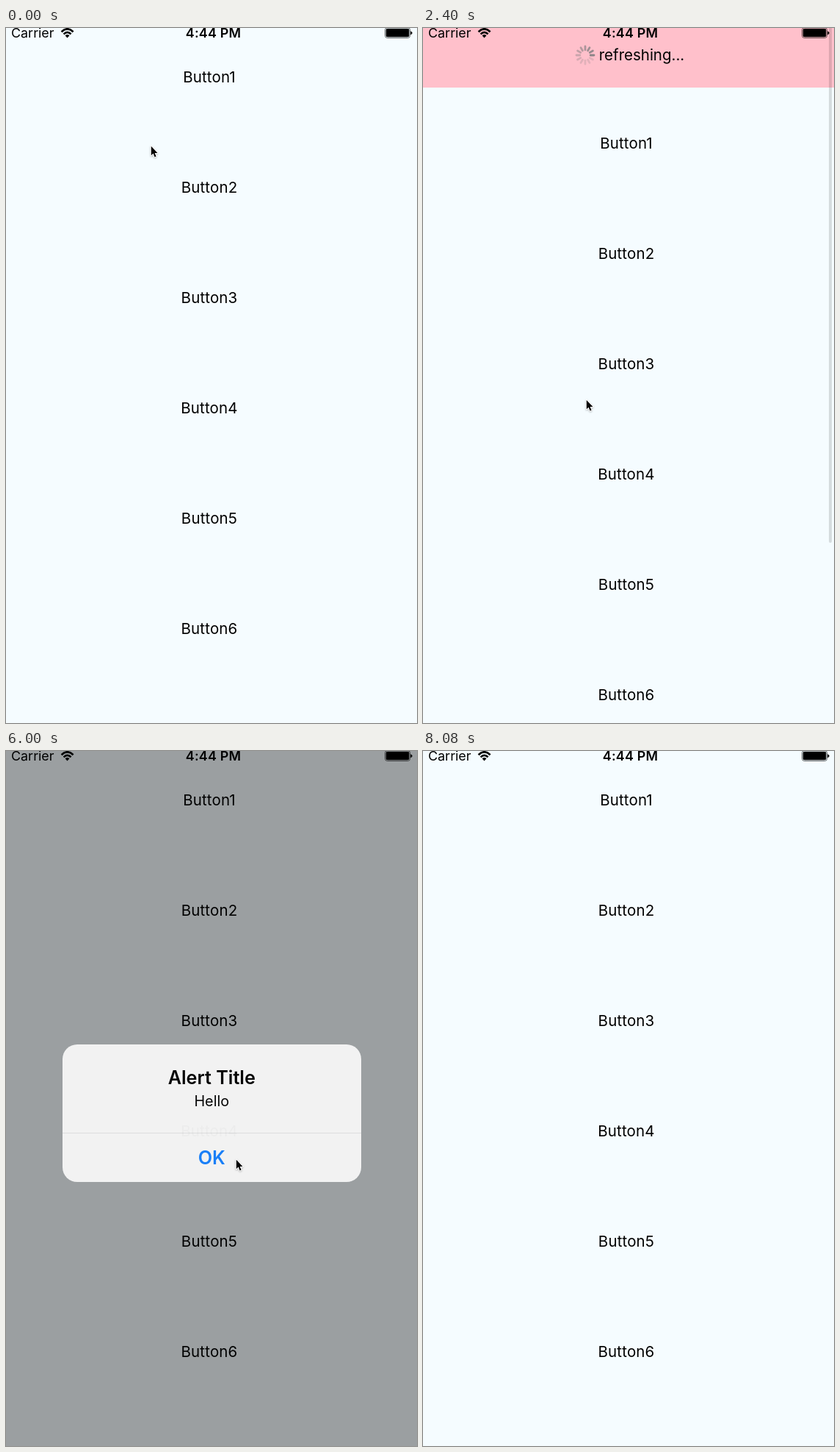
An HTML page for the animation above (8.27 s loop, 560x945 px).

```html
<!DOCTYPE html>
<html lang="en">
<head>
<meta charset="utf-8">
<title>Pull to refresh</title>
<style>
  html, body { margin: 0; width: 100%; height: 100%; overflow: hidden; }
  body { position: relative; background: #f5fcff; color: #000; font: 20.5px/24px Inter, Roboto, sans-serif; }
  body > *, .abs { position: absolute; }
  #scroll { left: 0; top: -99px; width: 560px; }
  #head {
    box-sizing: border-box; height: 90px; padding: 2px 0 0 2px; background: #ffc0cb;
    display: flex; align-items: center; justify-content: center; white-space: pre;
  }
  #arrow { width: 24px; height: 40px; margin: 0 10px; fill: #dc1f05; }
  #spin { width: 30px; height: 30px; margin-right: 4px; stroke: #8c8487; stroke-width: 2.8; stroke-linecap: round; }
  .row { width: 554px; height: 150px; line-height: 152px; text-align: center; letter-spacing: .15px; }
  #bar { left: 553px; top: -9px; width: 4px; border-radius: 2px; background: rgba(0, 0, 0, .35); }
  #shade { inset: 0; background: rgba(0, 0, 0, .4); }
  #status { left: 0; top: 0; }
  .carrier { left: 7px; top: -5px; font-size: 17.9px; }
  .clock { left: 0; top: -5px; width: 565px; text-align: center; font-size: 17.9px; font-weight: 600; letter-spacing: .2px; }
  #alert {
    left: 77px; top: 399px; width: 406.5px; height: 186.5px; border-radius: 20px;
    background: #f6f6f6; text-align: center;
  }
  #alert div { position: absolute; left: 0; width: 100%; }
  .title { top: 33px; font-size: 25.2px; font-weight: 600; }
  .note { top: 65px; font-size: 19.8px; }
  .line { top: 120px; height: 1px; background: #dfe0e1; }
  .ok { top: 142px; font-size: 25.2px; font-weight: 600; color: #147efb; }
  #cursor { left: -3px; top: -3px; filter: drop-shadow(0 1px 1px rgba(0, 0, 0, .25)); }
</style>
</head>
<body>
<div id="scroll">
  <div id="head">
    <svg id="arrow" viewBox="0 0 24 40"><path d="M12 0L24 13H17V17H7V13H0zM7 20H17V24H7zM7 27H17V31H7zM7 34H17V39.5H7z"/></svg>
    <svg id="spin" viewBox="-15 -15 30 30"></svg>
    <span id="label"></span>
  </div>
</div>
<div id="bar"></div>
<div id="status">
  <div class="abs carrier">Carrier</div>
  <div class="abs clock">4:44 PM</div>
  <svg class="abs" width="560" height="20" style="left:0;top:0">
    <g fill="none" stroke="#000" stroke-width="2.6">
      <path d="M75.6 5.2Q83.5 -2.6 91.6 5.2"/>
      <path d="M78.6 8.3Q83.5 3.4 88.6 8.3"/>
    </g>
    <path d="M80.6 10.2Q83.5 8 86.5 10.2L83.5 13.4z"/>
    <rect x="516.5" y="-.5" width="34" height="14" rx="3" fill="none" stroke="#000" stroke-opacity=".6"/>
    <rect x="517.7" y=".7" width="31.6" height="11.6" rx="2"/>
    <path d="M551.3 4.2Q553.6 5 553.6 6.7T551.3 9.2z"/>
  </svg>
</div>
<div id="shade"></div>
<div id="alert">
  <div class="title">Alert Title</div>
  <div class="note">Hello</div>
  <div class="line"></div>
  <div class="ok">OK</div>
</div>
<svg id="cursor" width="18" height="24" viewBox="-3 -3 18 24">
  <path d="M.8 .8V13.2L3.6 10.6L5.6 15.4L7.6 14.5L5.6 9.9H9.5z" stroke="#fff" stroke-width="2" stroke-linejoin="round" paint-order="stroke"/>
</svg>
<script>
  const LOOP = 8270, HOLD = 90, HEIGHT = 945;
  const RELEASE = 1950, DONE = 3750, CLOSE = 4200;
  const $ = id => document.getElementById(id);
  const [scroll, label, arrow, spin, bar, shade, alertBox, cursor] =
    ['scroll', 'label', 'arrow', 'spin', 'bar', 'shade', 'alert', 'cursor'].map($);

  const rows = [1, 2, 3, 4, 5, 6].map(n => {
    const row = document.createElement('div');
    row.className = 'row';
    row.textContent = 'Button' + n;
    scroll.append(row);
    return row;
  });

  for (let i = 0; i < 12; i++) {
    const spoke = document.createElementNS('http://www.w3.org/2000/svg', 'path');
    spoke.setAttribute('d', 'M0 -7.2V-12');
    spoke.setAttribute('transform', `rotate(${i * 30})`);
    spoke.setAttribute('opacity', Math.max(.25, i / 11));
    spin.append(spoke);
  }

  // Keys are [time, ...values]
  const pointer = [
    [450, 197, 160], [1650, 223, 524], [1950, 222, 522], [2550, 222, 502],
    [3600, 226, 322], [4200, 226, 322], [4950, 282, 222], [5250, 282, 222],
    [5800, 313, 555], [6000, 313, 555], [6400, 300, 374], [6600, 300, 374],
    [6900, 311, 480], [7050, 313, 553], [7200, 313, 553], [8000, 534, 938]
  ];
  const alertFade = [
    [5200, 0], [5650, 1], [5940, 1], [6000, .92], [6150, .4], [6300, .04], [6400, 0],
    [6500, 0], [6850, 1], [6990, 1], [7050, .92], [7200, .4], [7340, .03], [7480, 0]
  ];
  const barFade = [[450, 0], [750, 1], [2200, 1], [2540, 0]];

  const clamp = v => Math.min(1, Math.max(0, v));
  const smooth = p => p * p * (3 - 2 * p);
  const easeOut = p => 1 - (1 - p) ** 3;

  function track(keys, t) {
    const i = keys.findIndex(k => k[0] > t);
    if (i === 0) return keys[0].slice(1);
    if (i < 0) return keys[keys.length - 1].slice(1);
    const a = keys[i - 1], b = keys[i];
    const p = smooth((t - a[0]) / (b[0] - a[0]));
    return a.slice(1).map((v, j) => v + (b[j + 1] - v) * p);
  }

  // Overscroll resistance
  const rubber = d => HEIGHT * (1 - 1 / (1 + .55 * d / HEIGHT));

  function pull(t) {
    if (t < RELEASE) return rubber(Math.max(0, track(pointer, Math.min(t, 1650))[1] - 166));
    if (t < CLOSE) return HOLD + (rubber(358) - HOLD) * (1 - easeOut(clamp((t - RELEASE) / 400)));
    return HOLD * (1 - easeOut(clamp((t - CLOSE + 100) / 500)));
  }

  // The picture advances in ticks of about 150 ms
  function tick(t) {
    if (t < 600) return 0;
    if (t < 7340) return Math.floor(t / 150) * 150;
    return Math.min(8080, 7340 + Math.floor((t - 7340) / 148) * 148);
  }

  const pressed = (t, from, to) => t >= from && t < to ? .2 : 1;

  function render(t) {
    const off = pull(t);
    const percent = Math.min(100, Math.round(off / HOLD * 100));
    const dragging = t < RELEASE, busy = !dragging && t < DONE;
    scroll.style.transform = `translateY(${off}px)`;
    arrow.style.display = dragging ? '' : 'none';
    arrow.style.transform = percent < 100 ? 'rotate(180deg)' : '';
    spin.style.display = busy ? '' : 'none';
    spin.style.transform = `rotate(${Math.floor(t / 1000 * 12) * 30}deg)`;
    label.textContent = busy ? 'refreshing...'
      : !dragging ? 'refresh complete! 100%'
      : `${percent < 100 ? 'pull' : 'release'} to refresh  ${percent}%`;

    bar.style.height = 799 - off + 'px';
    bar.style.opacity = track(barFade, t)[0];
    rows[1].style.opacity = pressed(t, 5100, 5250);
    rows[2].style.opacity = pressed(t, 6450, 6600);

    const [fade] = track(alertFade, t);
    const entering = t < 5800 || (t > 6450 && t < 6950);
    shade.style.opacity = fade;
    alertBox.style.opacity = Math.sqrt(fade);
    alertBox.style.transform = entering ? `scale(${1 + .15 * (1 - fade)})` : '';

    const [x, y] = track(pointer, t);
    cursor.style.transform = `translate(${x}px, ${y}px)`;
    cursor.style.visibility = t < 8080 ? 'visible' : 'hidden';
  }

  const start = performance.now();
  function loop() {
    render(tick((performance.now() - start) % LOOP));
    requestAnimationFrame(loop);
  }
  loop();
</script>
</body>
</html>
```
